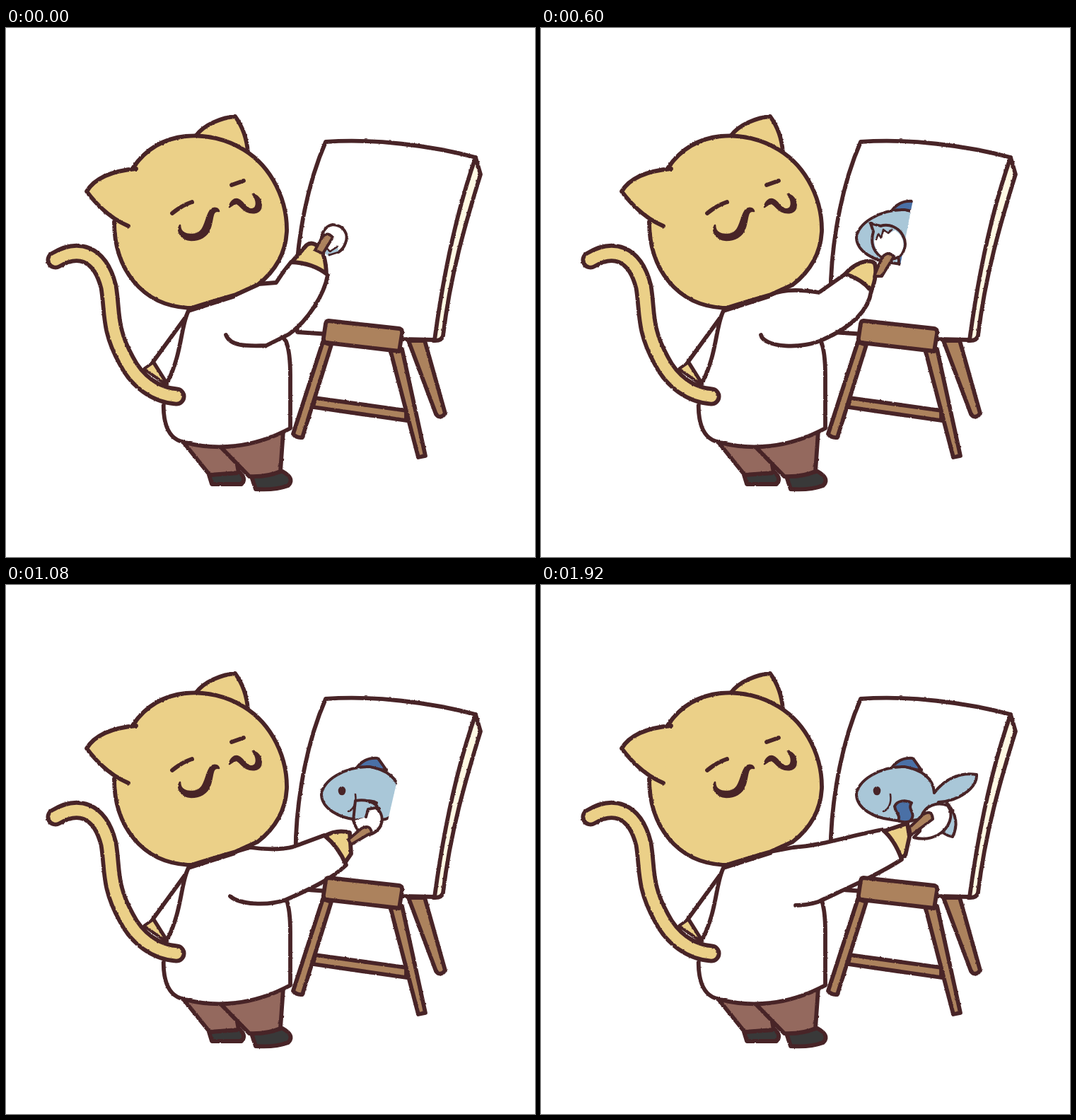
Recreate the animation shown at these times as an HTML page. Size 748 by 748 pixels, loop 2.4 s.

```html
<!DOCTYPE html>
<html lang="en">
<head>
<meta charset="utf-8">
<title>Cat painter</title>
<style>
  html, body { margin: 0; width: 100%; height: 100%; overflow: hidden; background: #fff; }
  svg { display: block; width: 100%; height: 100%; }
  .ink { fill: none; stroke: #482427; stroke-width: 5.8; stroke-linejoin: round; stroke-linecap: round; }
  .thin { stroke-width: 4; }
  .fine { stroke-width: 2.6; }
  .white { fill: #fff; }
  .fur { fill: #ebd088; }
  .wood { fill: #ac825d; }
  .pants { fill: #94695e; }
  .shoe { fill: #393939; }
  .sky { fill: #a9c7d8; }
  .blue { fill: #4a70a6; }
  .dark { fill: #482427; }
  .bare { stroke: none; }
  .pose { display: none; }
</style>
</head>
<body>
<svg viewBox="0 0 748 748">
  <defs>
    <filter id="rough" filterUnits="userSpaceOnUse" width="748" height="748" color-interpolation-filters="sRGB">
      <feTurbulence type="fractalNoise" baseFrequency=".24" numOctaves="2" seed="4"/>
      <feDisplacementMap in="SourceGraphic" scale="2.2" xChannelSelector="R" yChannelSelector="G"/>
    </filter>
    <clipPath id="painted"><path id="paintedArea"/></clipPath>
    <path id="tail" d="M70 328C100 310 132 315 145 366C151 402 145 425 170 470C185 500 212 519 241 521"/>
  </defs>
  <g class="ink" filter="url(#rough)">
    <!-- easel -->
    <path class="wood" d="M569 442L608 546Q614 554 621 545L592 442Z"/>
    <path class="wood" d="M437 523L566 541L566 555L434 536Z"/>
    <path class="wood" d="M448 444L406 574Q411 580 419 579L460 448Z"/>
    <path class="wood" d="M543 454L583 607L593 605L560 454Z"/>
    <path fill="#fff9e3" d="M664 183L671 207C650 275 628 350 618 435Q616 443 604 442L560 300Z"/>
    <path class="white" d="M452 161C520 156 600 166 664 183C638 257 619 345 606 441L560 440L412 430C402 330 424 225 452 161Z"/>

    <!-- painting -->
    <g clip-path="url(#painted)" class="thin">
      <path class="blue" d="M497 257C504 248 513 244 526 245L531 252L538 262Z"/>
      <path class="sky" d="M562 343C568 352 575 355 582 356C591 338 586 322 574 308Z"/>
      <path class="sky" d="M446 297C446 277 480 256 514 257C538 261 555 273 556 294C570 275 592 264 616 268C617 287 590 306 562 307C556 322 545 328 537 331Q515 336 496 332C470 329 447 316 446 297Z"/>
      <ellipse class="dark bare" cx="475" cy="291" rx="5.3" ry="6.3"/>
      <path class="fine" d="M494 296C496 309 491 318 484 320"/>
      <path class="blue" d="M500 313C503 305 515 303 524 308C517 318 532 322 522 334Q513 337 505 333C509 326 501 322 500 313Z"/>
    </g>

    <!-- legs -->
    <path class="shoe" d="M287 632L291 645L333 645Q341 637 329 627Z"/>
    <path class="pants" d="M251 586L288 632L329 629L322 590Z"/>
    <path class="shoe" d="M347 634L353 652Q380 654 399 647Q409 637 391 627Z"/>
    <path class="pants" d="M305 594L344 634Q370 635 388 627L392 570Z"/>

    <!-- resting arm and coat -->
    <path class="white" d="M259 402L208 472L228 504L252 450Z"/>
    <path class="fur thin" d="M195 482L208 473L229 506Z"/>
    <path class="white" d="M258 400C247 420 249 463 227 503C219 535 221 575 246 584C295 599 350 594 402 566V490Q402 459 396 443L340 374Z"/>

    <!-- painting arm -->
    <g class="pose">
      <path class="white thin" d="M452 314C440 304 446 281 462 278C478 279 485 292 480 304Q477 313 470 317"/>
      <path class="sky bare" d="M449 317L454 311L458 316L469 308L470 317L457 323Z"/>
      <path class="fine" d="M454 312L458 316L469 309M470 317L457 321"/>
      <path class="fur" d="M403 332L425 307Q433 301 442 310Q452 319 453 348Z"/>
      <path class="wood thin" d="M437 314L447 296Q454 287 462 296L448 319Z"/>
      <path class="white" d="M325 377L357 362L382 360Q392 344 403 331Q434 332 455 349C450 377 427 414 400 433L368 449C340 450 317 450 311 434"/>
    </g>

    <g class="pose">
      <path class="sky thin" d="M466 276L470 288C464 308 474 330 500 326C515 321 518 305 512 294C506 282 492 276 480 280Z"/>
      <path class="white bare" d="M471 301L476 293L480 297L484 285L491 291L500 286C513 293 516 308 508 320Q495 329 480 321Q472 313 471 301Z"/>
      <path class="fine" d="M474 299L477 291L481 297L484 285L491 290L496 285"/>
      <path class="fur" d="M429 349Q439 337 452 332Q466 327 472 333Q476 349 467 372Z"/>
      <path class="wood thin" d="M471 351L482 325Q490 314 499 323L482 351Z"/>
      <path class="white" d="M325 377C345 368 370 370 393 374L430 348Q454 355 467 372C463 398 443 421 400 440C370 455 315 452 311 434"/>
    </g>

    <g class="pose">
      <path class="sky thin" d="M494 305Q515 301 528 316L512 330L491 333Z"/>
      <path class="white bare" d="M493 333L509 328L511 318L522 315C537 325 533 345 514 353Q496 350 493 333Z"/>
      <path class="thin" d="M491 332Q494 346 503 350M509 328L512 317L523 315C537 325 534 347 514 353"/>
      <path class="fur" d="M450 355Q468 345 486 350L488 380L477 396Z"/>
      <path class="wood thin" d="M484 360L503 344Q515 338 517 350L488 367Z"/>
      <path class="white" d="M325 377L345 371C370 375 400 374 412 368L450 354Q470 370 481 396C460 416 430 430 396 445C370 454 330 452 317 440"/>
    </g>

    <g class="pose">
      <path class="white thin" d="M538 327C543 312 560 306 575 312C585 325 577 344 562 353Q546 362 527 357L536 348Z"/>
      <path class="fur" d="M485 348L518 337L521 356L515 383L507 386Z"/>
      <path class="wood thin" d="M521 343L541 324Q553 317 554 331L523 354Z"/>
      <path class="white" d="M325 377L357 371C400 368 438 354 483 346Q500 360 510 388C480 408 430 430 392 448Q376 453 360 453"/>
    </g>

    <path class="wood" d="M456 414L556 425Q561 426 560 432L556 457L453 445Q448 444 449 438L452 418Q453 414 456 414Z"/>

    <use href="#tail" stroke-width="27"/>
    <use href="#tail" stroke="#ebd088" stroke-width="15.5"/>

    <!-- head -->
    <path class="fur" d="M268 153C280 136 305 127 324 125Q340 147 342 176Z"/>
    <path class="fur" d="M180 197C218 142 288 143 336 172C377 197 398 245 397 288C395 322 378 346 356 363L325 377Q290 387 262 396C190 394 153 338 153 274"/>
    <path class="fur" d="M184 199C150 202 125 213 114 231Q140 266 173 280"/>

    <!-- face -->
    <path d="M235 262Q248 251 263 246M319 222L336 216"/>
    <g class="dark" stroke-width="2.6">
      <path d="M246 279C246 289 254 293 264 292C284 291 281 266 290 257C294 253 300 255 301 259C291 257 293 268 289 281C285 296 272 300 262 300C248 299 241 288 246 279Z"/>
      <path d="M316 253C317 246 323 240 329 243C336 246 337 254 345 256C355 258 357 246 349 235C359 238 362 247 360 255C357 263 346 262 340 259C332 255 329 247 325 248Q321 249 316 253Z"/>
    </g>
  </g>
</svg>
<script>
  const poses = document.querySelectorAll('.pose');
  const paintedArea = document.getElementById('paintedArea');
  const starts = [0, 600, 900, 1200];
  const areas = [
    'M0 0',
    'M400 200H527L526 243L507 340H400Z',
    'M400 200H554V272L537 346H400Z',
    'M400 200H660V400H400Z'
  ];
  let shown = -1;

  function draw() {
    const time = performance.now() % 2400;
    const step = starts.filter(start => start <= time).length - 1;
    if (step !== shown) {
      shown = step;
      poses.forEach((pose, i) => pose.style.display = i === step ? 'inline' : 'none');
      paintedArea.setAttribute('d', areas[step]);
    }
    requestAnimationFrame(draw);
  }
  draw();
</script>
</body>
</html>
```
